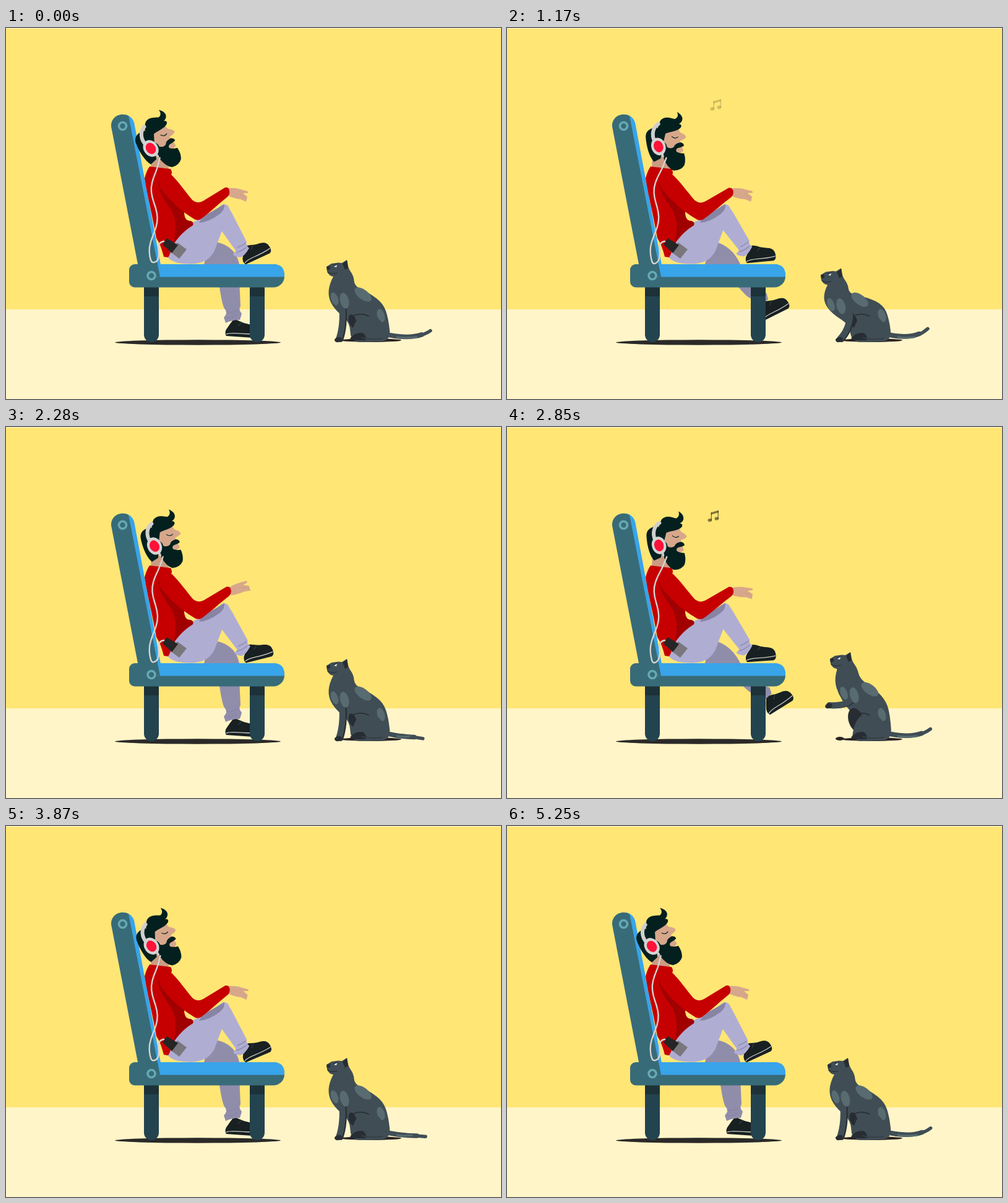
An HTML page with a canvas that plays this animation: 800x600 px, repeating every 5280 ms.

```html
<!DOCTYPE html>
<html lang="en">
<head>
<meta charset="utf-8">
<title>Listening on a bench</title>
<style>
html, body { margin: 0; width: 100%; height: 100%; overflow: hidden; background: #ffe675; }
canvas { display: block; width: 800px; height: 600px; }
</style>
</head>
<body>
<canvas id="stage" width="800" height="600"></canvas>
<script>
const ctx = document.getElementById('stage').getContext('2d');
const LOOP = 5280, TAU = Math.PI * 2;
const C = {
  wall: '#ffe675', floor: '#fff5c8', shadow: '#2b2928',
  post: '#386b78', blue: '#38a4ea', ring: '#65a9b4', leg: '#23434f', legTop: '#1c3238',
  pants: '#b0add3', pantsShade: '#908dab', fold: '#8784a4', shoe: '#182022', sole: '#c9c9c4',
  red: '#c60000', redShade: '#a10000', skin: '#d7a78b', neck: '#cb9c82', hair: '#03201f',
  metal: '#cfcfcf', pad: '#ff1238', cord: '#d6d3cf',
  cat: '#404d55', catLight: '#586b70', catDark: '#272d32'
};

const clamp = v => Math.max(0, Math.min(1, v));
const smooth = v => { v = clamp(v); return v * v * (3 - 2 * v); };
const lerp = (a, b, u) => a + (b - a) * u;
const ramp = (t, a, b) => smooth((t - a) / (b - a));
const pulse = (t, a, b, c, d) => ramp(t, a, b) - ramp(t, c, d);
const wave = turns => (1 - Math.cos(TAU * turns)) / 2;

function shape(d, color) {
  ctx.fillStyle = color;
  ctx.fill(new Path2D(d));
}

function line(d, color, width) {
  ctx.strokeStyle = color;
  ctx.lineWidth = width;
  ctx.stroke(new Path2D(d));
}

function oval(x, y, rx, ry, color, rot = 0) {
  ctx.beginPath();
  ctx.ellipse(x, y, rx, ry, rot, 0, TAU);
  ctx.fillStyle = color;
  ctx.fill();
}

function box(x, y, w, h, r, color) {
  ctx.beginPath();
  ctx.roundRect(x, y, w, h, r);
  ctx.fillStyle = color;
  ctx.fill();
}

const mid = (a, b) => [(a[0] + b[0]) / 2, (a[1] + b[1]) / 2];

// Closed outline through the midpoints of its points
function blob(pts, color) {
  ctx.beginPath();
  ctx.moveTo(...mid(pts[pts.length - 1], pts[0]));
  pts.forEach((p, i) => ctx.quadraticCurveTo(...p, ...mid(p, pts[(i + 1) % pts.length])));
  ctx.fillStyle = color;
  ctx.fill();
}

// Open rounded line
function wire(pts, color, width) {
  const last = pts.length - 1;
  ctx.beginPath();
  ctx.moveTo(...pts[0]);
  for (let i = 1; i < last; i++)
    ctx.quadraticCurveTo(...pts[i], ...(i === last - 1 ? pts[last] : mid(pts[i], pts[i + 1])));
  ctx.strokeStyle = color;
  ctx.lineWidth = width;
  ctx.stroke();
}

function group(draw) { ctx.save(); draw(); ctx.restore(); }

function turn(x, y, deg) {
  ctx.translate(x, y);
  ctx.rotate(deg * Math.PI / 180);
  ctx.translate(-x, -y);
}

/* ---- timing ---- */

// 0 leaning back, 1 leaning forward
function sway(t) {
  const d = t / 1760 - 0.065;
  return smooth(wave(d + 0.05 * Math.sin(Math.PI * d) ** 2));
}

const handLift = t => smooth(wave(t / 1320));

// Short wind-up, then a kick
function kick(t) {
  const u = (t - 800) % 1620;
  return 16 * pulse(u, 0, 210, 210, 300) - 36 * pulse(u, 250, 410, 440, 550);
}

/* ---- scene ---- */

function room() {
  ctx.fillStyle = C.wall;
  ctx.fillRect(0, 0, 800, 455);
  ctx.fillStyle = '#fff8dc';
  ctx.fillRect(0, 0, 800, 1);
  ctx.fillStyle = C.floor;
  ctx.fillRect(0, 455, 800, 145);
  oval(310, 508.5, 134, 4.2, C.shadow);
}

function ring(x, y) {
  ctx.beginPath();
  ctx.arc(x, y, 6, 0, TAU);
  ctx.strokeStyle = C.ring;
  ctx.lineWidth = 3.6;
  ctx.stroke();
}

function bench() {
  for (const x of [223, 394]) {
    box(x, 410, 24, 98, [0, 0, 12, 12], C.leg);
    ctx.fillStyle = C.legTop;
    ctx.fillRect(x, 419, 24, 15);
  }
  box(199, 382, 251, 37.5, [9, 18, 18, 9], C.post);
  shape('M240 382H432Q450 382 450 400V402.5H240Z', C.blue);
  shape('M189 140C201 140 207 148 208 158L250 383L249 402H240Z', C.blue);
  shape('M198 142L249 402.5H236L213 382L170.5 162C167 145 184 135 198 142Z', C.post);
  ring(188.5, 158.5);
  ring(235, 400.5);
}

function shoe() {
  shape('M397 354.5Q391 363 386 372Q384 378 387 382H430Q435 380 434 372C433 363 427 361 419 360C410 359 403 354 397 354.5Z', C.shoe);
  line('M387 379C397 374 407 379 433 375', C.sole, 1.3);
  line('M405 364L410 359', '#3c4648', 1);
}

function farLeg(angle) {
  const out = clamp(-angle / 36);
  shape(`M320 382L330 345C${352 - 7 * out} 346 ${372 - 7 * out} 357 377 382Z`, C.pantsShade);
  group(() => {
    ctx.beginPath();
    ctx.rect(300, 400, 200, 200);
    ctx.clip();
    turn(340, 375, angle);
    group(() => {
      ctx.translate(-31, 116);
      turn(386, 381, 4);
      shoe();
    });
    shape('M343 385H376L379 450Q375 456 381 462L378 472Q366 472 355 477L352 468Q359 461 354 455Q350 452 345 419Z', C.pantsShade);
    line('M356 459Q364 463 375 455M357 469Q366 469 373 464', C.fold, 1.3);
  });
}

function nearLeg(k) {
  shape('M258 362C260 374 270 381 295 381.5C318 382 330 374 337 360L349 328L362 296Q360 284 351 285L328 302L300 315L280 330Z', C.pants);
  group(() => {
    turn(352, 292, -3.3 * k);
    group(() => {
      turn(386, 372, -25 * (1 - k));
      ctx.translate(-4, 0);
      shoe();
    });
    shape('M338 300Q345 284 354 286Q361 290 367 303L389 346Q387 351 393 356Q385 370 378 371Q366 369 367 365Q374 362 369 357L347 326Z', C.pants);
    line('M374 355Q382 352 387 348M372 363Q381 361 388 355', C.fold, 1.2);
  });
  shape('M312 315Q316 305 334 296L353 285Q354 294 345 301Q328 314 312 315Z', C.fold);
}

function torso() {
  shape('M235 204H262L263 230H234Z', C.neck);
  shape('M232 224Q250 226 266 228Q270 234 266 239L288 297Q288 312 298 312Q304 314 302 319C290 326 283 334 274 345C268 353 266 366 262 371L255 370Q250 350 243 340C238 310 229 275 224 243Q227 231 232 224Z', C.red);
  shape('M246 249C247 273 266 288 271 303C277 320 273 336 271 349Q282 331 302 319Q304 313 297 312Q287 312 288 297L268 270Z', C.redShade);
  shape('M277 347L292 358L280 373L264 361Z', '#79777c');
  shape('M260 340L278 351L268 364L253 350Z', '#252526');
}

function arm(k, lift) {
  group(() => {
    ctx.translate(255, 0);
    ctx.transform(1 + 0.048 * k, 0.006 * k, 0, 1, 0, 0);
    ctx.translate(-255, 0);
    group(() => {
      turn(361, 266, -54 * lift);
      shape('M357 259Q368 258 376 260L390 264Q393 266 390 267H383L390 273L388 281L379 277Q369 276 358 271Z', C.skin);
      line('M378 269L388 276', C.neck, 0.9);
    });
    shape('M246 240Q258 230 268 238C280 250 290 265 301 278Q309 285 318 280L354 258Q360 257 361 263Q362 269 358 273C345 283 331 297 315 309Q308 313 301 307C283 296 262 277 249 258Z', C.red);
  });
}

function head(k) {
  group(() => {
    turn(250, 230, -18.5 * (1 - k));
    shape('M244 160C232 162 225 166 226 178C227 193 231 208 238 216L249 211L256 172Z', C.hair);
    shape('M250 170L279 164L282 170Q291 174 291 178Q288 182 281 183L283 189L286 200L276 206L252 199Z', C.skin);
    shape('M247 178Q243 160 251 149C258 142 267 146 274 148Q281 145 278 136.5Q287 142 286 149Q285 154 280 156Q286 157 283 162C278 168 265 168 258 171L254 186L246 188Z', C.hair);
    shape('M252 184Q259 185 260 193Q266 197 271 193Q273 187 282 186Q288 188 287 192Q283 194 277 195Q273 197 275 201Q280 204 287 204Q290 214 287 223Q281 232 269 231Q259 226 254 211Z', C.hair);
    line('M268 176Q273 181 278 177', C.hair, 1.1);
    line('M240 183C235 172 238 160 247 155', C.metal, 6);
    oval(246, 191.5, 11.5, 14.5, '#d4d4d4', -0.3);
    oval(246, 191.5, 7.6, 9.6, C.pad, -0.3);
    line('M252 204L253 208', C.metal, 3);
  });
}

// Wavy fall from the headphones, then a hook up to the phone
function cord(k) {
  const pts = [];
  for (let u = 0; u <= 1; u += 0.1)
    pts.push([242 - 5 * u + 6.5 * Math.cos(TAU * u / 0.62) + 10 * k * (1 - u) ** 3, 210 + 160 * u]);
  pts.push([236, 381 + 3 * k], [248, 375], [245, 346], [255, 345]);
  wire(pts, C.cord, 2.4);
}

function note(t) {
  const age = (t - 750) % 1860 - 120;
  if (age < -120 || age > 520) return;
  const fly = Math.max(0, age);
  group(() => {
    ctx.globalAlpha = Math.min(clamp((age + 120) / 60), Math.exp(-fly / 175));
    ctx.translate(27 * (1 - Math.exp(-fly / 65)) + 0.06 * Math.min(0, age), -0.11 * age);
    for (const [x, y] of [[305, 164], [316, 161.5]]) {
      oval(x, y, 3.3, 2.7, '#080800', -0.2);
      line(`M${x + 2.5} ${y}v-12`, '#080800', 1.4);
    }
    shape('M307 151.5L319 148V151.5L307 155Z', '#080800');
  });
}

/* ---- cat ---- */

const outline = [[531, 396], [521, 420], [522, 440], [534, 458], [556, 476], [557, 508], [590, 508],
  [622, 506], [618, 470], [610, 446], [588, 429], [563, 418], [562, 400], [549, 384]];

function tail(t) {
  const w = wave(t / 1760 - 0.3);
  const a = (6 - 20 * w) * Math.PI / 180, r = 56 + 14 * Math.sin(Math.PI * w);
  const x = 618 + r * Math.cos(a), y = 498 + r * Math.sin(a);
  line(`M608 494C632 500 ${x - 30} 501 ${x - 14} ${lerp(500, y, 0.4)}`, C.cat, 7.5);
  line(`M640 499C650 500 ${x - 14} ${lerp(501, y, 0.1)} ${x} ${y}`, C.cat, 5.5);
  line(`M632 500Q645 502 ${x - 22} 500`, C.catLight, 3);
}

function catHead() {
  shape('M518 386L526 381L537 379.5L543 380L551 375L553 386L560 402Q556 412 530 409L529 402Q522 401 519 394Z', C.cat);
  shape('M544 381L551 375.5L553 388L548 391Z', C.catDark);
  shape('M518 386L524 385V390L519 392Z', C.catDark);
  line('M520 395Q528 399 535 396', C.catDark, 1.2);
  shape('M530 386L535 383L534 387Z', '#e8efef');
  line('M529 384L535 382', C.catDark, 1);
}

function cat(t) {
  const lean = pulse(t, 250, 600, 1750, 2200);
  const rear = pulse(t, 2450, 2780, 3250, 3650);
  const dx = 4 * rear - 11 * lean, dy = 13.5 * lean - 11 * rear;

  // The higher a point sits, the more it follows the head; rearing also arches the chest
  const bend = ([x, y]) => {
    const w = clamp((500 - y) / 90), hold = clamp((625 - x) / 60);
    return [x + hold * (w * dx + 13 * rear * Math.sin(Math.PI * w)), y + hold * w * dy];
  };
  const patch = (x, y, rx, ry, rot) => oval(...bend([x, y]), rx, ry, C.catLight, rot);

  oval(590, 505, 49, 3, '#2d2424');
  oval(538, 504, 7, 3, '#2d2424');
  tail(t);

  blob(outline.map(bend), C.cat);
  patch(577, 431, 16, 8, 0.65);
  oval(606, 465, 6, 11, C.catLight, -0.3);
  oval(560 + 4 * rear, 474, 6 + 6 * rear, 11 + 9 * rear, C.catDark, -0.3);
  shape('M558 503C560 476 570 462 587 463C607 466 614 485 612 504L580 507Z', C.cat);
  line('M558 467Q573 459 586 466', C.catDark, 1.5);
  shape('M556 502Q563 492 576 493Q584 498 581 505H560Z', C.catDark);
  line('M575 501Q592 505 608 502', '#353f46', 2);

  const [sx, sy] = bend([543, 446]);
  const top = [sx + 18 * lean, sy + 10 * lean];
  const paw = [538 - 17 * rear, 503 - 53 * rear];
  const leg = [top, [lerp(top[0], paw[0], 0.4) + 5, lerp(top[1], paw[1], 0.6) + 6 * rear], paw];
  wire(leg.map(([x, y]) => [x + 3, y + 1]), C.catDark, 8);
  wire(leg, C.cat, 10);
  patch(531, 438, 5.5, 11, -0.35);
  patch(547, 441, 7, 13, -0.25);
  oval(paw[0] - 1, paw[1] + 1, 6, 4, C.catDark, -0.3);

  group(() => {
    ctx.translate(dx, dy);
    catHead();
  });
}

function draw(t) {
  const k = sway(t);
  ctx.lineCap = 'round';
  ctx.lineJoin = 'round';
  room();
  farLeg(kick(t));
  bench();
  nearLeg(k);
  torso();
  head(k);
  arm(k, handLift(t));
  cord(k);
  note(t);
  cat(t);
}

const start = performance.now();
function frame() {
  draw((performance.now() - start) % LOOP);
  requestAnimationFrame(frame);
}
frame();
</script>
</body>
</html>
```
